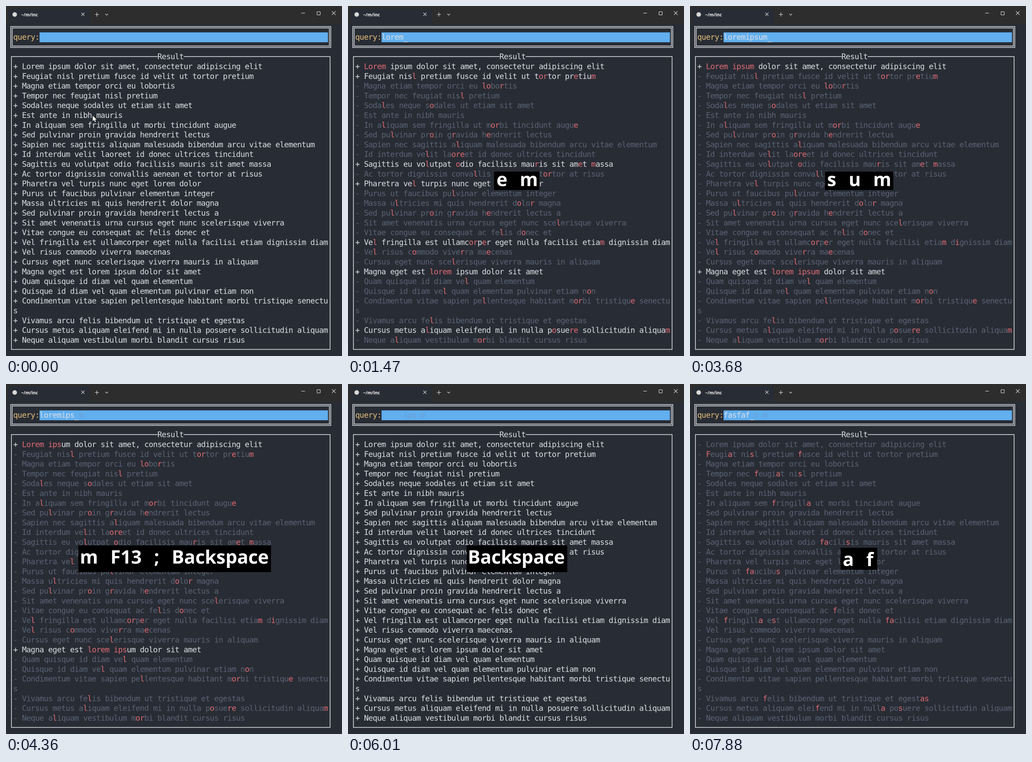
An HTML page with a canvas for the animation above (8 s loop, 734 px wide and 763 px high).

```html
<!DOCTYPE html>
<html lang="en">
<head>
<meta charset="utf-8">
<title>Incremental search</title>
<style>
  html, body { margin: 0; width: 100%; height: 100%; overflow: hidden; background: #282c34; }
  canvas { display: block; width: 734px; height: 763px; }
</style>
</head>
<body>
<canvas width="1468" height="1526"></canvas>
<script>
const ctx = document.querySelector('canvas').getContext('2d');
ctx.scale(2, 2); // double resolution keeps rows at fractional heights

const LOOP = 8000, COLS = 72, CELL = 9.545, PITCH = 21.3, LEFT = 16.1, BASE = 137.5;
const INSET = -0.35; // centres a glyph in its slightly narrower cell
const BG = '#282c34', FG = '#dcdfe4', DIM = '#5a6374', RED = '#e06c75', YELLOW = '#e5c07b', BLUE = '#61afef';
const MONO = '17px "DejaVu Sans Mono", monospace';

const lines = `Lorem ipsum dolor sit amet, consectetur adipiscing elit
Feugiat nisl pretium fusce id velit ut tortor pretium
Magna etiam tempor orci eu lobortis
Tempor nec feugiat nisl pretium
Sodales neque sodales ut etiam sit amet
Est ante in nibh mauris
In aliquam sem fringilla ut morbi tincidunt augue
Sed pulvinar proin gravida hendrerit lectus
Sapien nec sagittis aliquam malesuada bibendum arcu vitae elementum
Id interdum velit laoreet id donec ultrices tincidunt
Sagittis eu volutpat odio facilisis mauris sit amet massa
Ac tortor dignissim convallis aenean et tortor at risus
Pharetra vel turpis nunc eget lorem dolor
Purus ut faucibus pulvinar elementum integer
Massa ultricies mi quis hendrerit dolor magna
Sed pulvinar proin gravida hendrerit lectus a
Sit amet venenatis urna cursus eget nunc scelerisque viverra
Vitae congue eu consequat ac felis donec et
Vel fringilla est ullamcorper eget nulla facilisi etiam dignissim diam
Vel risus commodo viverra maecenas
Cursus eget nunc scelerisque viverra mauris in aliquam
Magna eget est lorem ipsum dolor sit amet
Quam quisque id diam vel quam elementum
Quisque id diam vel quam elementum pulvinar etiam non
Condimentum vitae sapien pellentesque habitant morbi tristique senectus
Vivamus arcu felis bibendum ut tristique et egestas
Cursus metus aliquam eleifend mi in nulla posuere sollicitudin aliquam
Neque aliquam vestibulum morbi blandit cursus risus`.split('\n');

// time in ms, query, keys on screen
const steps = [
  [0, '', ''], [270, 'l', 'l'], [540, 'lo', 'l o'], [610, 'lor', 'l o r'],
  [1200, 'lor', 'o r'], [1270, 'lore', 'o r e'], [1400, 'lore', 'r e'], [1470, 'lorem', 'e m'],
  [2210, 'lorem', 'm'], [2340, 'loremi', 'm i'], [2410, 'loremi', 'i'],
  [2670, 'loremip', 'i'], [2740, 'loremip', 'i p'],
  [3270, 'loremip', 'p'], [3340, 'loremips', 'p s'], [3410, 'loremipsu', 'p s u'], [3680, 'loremipsum', 's u m'],
  [4020, 'loremipsum', 's u m F13'], [4090, 'loremipsum', 's u m F13 ;'],
  [4220, 'loremipsu', 's u m F13 ; Backspace'], [4290, 'loremipsu', 'u m F13 ; Backspace'],
  [4360, 'loremips', 'm F13 ; Backspace'], [4490, 'loremip', 'm F13 ; Backspace'],
  [4560, 'loremip', 'F13 ; Backspace'], [4690, 'loremi', 'F13 ; Backspace'],
  [4950, 'lorem', '; Backspace'], [5010, 'lore', 'Backspace'], [5210, 'lor', 'Backspace'],
  [5280, 'lo', 'Backspace'], [5350, '', 'Backspace'], [6010, '', 'Backspace'],
  [6350, 'f', 'f'], [6620, 'fa', 'f a'], [6750, 'fas', 'f a s'], [6950, 'fasf', 'f a s f'],
  [7280, 'fasf', 'a s f'], [7350, 'fasfa', 'a s f a'], [7550, 'fasfa', 's f a'],
  [7680, 'fasfaf', 'f a f'], [7880, 'fasfaf', 'a f']
];

function fill(color, x, y, w, h) {
  ctx.fillStyle = color;
  ctx.fillRect(x, y, w, h);
}

function frame(x, y, right, bottom) {
  ctx.strokeRect(x, y, right - x, bottom - y);
}

function trace(...points) {
  ctx.beginPath();
  points.forEach(([x, y], i) => i ? ctx.lineTo(x, y) : ctx.moveTo(x, y));
}

function path(...points) {
  trace(...points);
  ctx.stroke();
}

function cross(x, y, r) {
  path([x - r, y - r], [x + r, y + r]);
  path([x - r, y + r], [x + r, y - r]);
}

// Places each character in its terminal cell, wrapping at the last column
function print(text, row, col, colorAt) {
  ctx.font = MONO;
  [...text].forEach((ch, i) => {
    const n = col + i;
    ctx.fillStyle = colorAt(i);
    ctx.fillText(ch, LEFT + INSET + n % COLS * CELL, BASE + (row + Math.floor(n / COLS)) * PITCH);
  });
}

function drawTitleBar() {
  fill('#2d2d2d', 0, 0, 734, 38);
  ctx.fillStyle = BG;
  ctx.beginPath();
  ctx.roundRect(5, 6, 178, 32, [6, 6, 0, 0]);
  ctx.fill();
  ctx.fillStyle = '#d8d8d8';
  ctx.beginPath();
  ctx.arc(19, 18.5, 5, 0, 7);
  ctx.fill();
  ctx.fillStyle = '#fff';
  ctx.font = 'bold 9.5px "Open Sans", sans-serif';
  ctx.fillText('~/m/inc', 33, 22.5);
  ctx.strokeStyle = '#e4e4e4';
  ctx.lineWidth = 1;
  cross(168, 18, 3.5);
  path([194.5, 18.5], [203, 18.5]);
  path([198.5, 14], [198.5, 23]);
  path([217, 17], [220, 20], [223, 17]);
  path([645, 15.5], [653, 15.5]);
  ctx.beginPath();
  ctx.roundRect(679.5, 12.5, 7, 7, 1);
  ctx.stroke();
  cross(716, 15.5, 4);
}

function drawBoxes() {
  ctx.strokeStyle = FG;
  ctx.lineWidth = 1.5;
  frame(10.4, 44.7, 709.5, 90.4);
  frame(13.5, 47.8, 706.5, 87.3);
  frame(11.8, 110.3, 708, 748.6);
  fill(BG, LEFT + 33 * CELL, 102, 6 * CELL, 16);
  print('Result', -1, 33, () => FG);
}

function drawQuery(t, query) {
  print('query:', -3, 0, () => YELLOW);
  fill(BLUE, 73.3, 57.5, 630, 21.5);
  // Faint remains of erased letters
  if (t >= 4220) {
    print('     ips m', -3, 6, i => i > query.length ? '#6a9fd4' : 'transparent');
  }
  print(query, -3, 6, () => FG);
  if (query || t === 5350) fill(FG, LEFT + (6 + query.length) * CELL, 78, CELL, 1);
}

function drawResults(query) {
  let row = 0;
  for (const line of lines) {
    let found = 0;
    const hits = [...line.toLowerCase()].map(ch => ch === query[found] && ++found > 0);
    const match = found === query.length;
    const text = (match ? '+ ' : '- ') + line;
    print(text, row, 0, i => hits[i - 2] ? RED : match ? FG : DIM);
    row += Math.ceil(text.length / COLS);
  }
}

function drawPointer(x, y) {
  trace([x, y], [x, y + 12], [x + 2.8, y + 9.5], [x + 4.8, y + 14],
    [x + 6.8, y + 13], [x + 4.9, y + 8.8], [x + 8.5, y + 8.6]);
  ctx.closePath();
  ctx.strokeStyle = '#000';
  ctx.lineWidth = 1;
  ctx.stroke();
  ctx.fillStyle = '#fff';
  ctx.fill();
}

function drawKeys(keys) {
  if (!keys) return;
  const text = keys.replaceAll(' ', '  ');
  ctx.font = 'bold 40.4px "Open Sans", "Noto Sans", sans-serif';
  ctx.wordSpacing = '3px';
  const m = ctx.measureText(text);
  const left = m.actualBoundingBoxLeft, up = m.actualBoundingBoxAscent;
  const w = left + m.actualBoundingBoxRight, h = up + m.actualBoundingBoxDescent;
  const x = 368.8 - w / 2, y = 381.2 - h / 2;
  fill('#000', Math.round(x - 6), Math.round(y - 8.5), Math.round(w + 12), Math.round(h + 17));
  ctx.fillStyle = '#fff';
  ctx.fillText(text, x + left, y + up);
  ctx.wordSpacing = '0px';
}

let shown;
function tick(now) {
  const step = steps.findLast(s => s[0] <= now % LOOP);
  if (step !== shown) {
    shown = step;
    const [t, query, keys] = step;
    fill(BG, 0, 0, 734, 763);
    drawTitleBar();
    drawBoxes();
    drawQuery(t, query);
    drawResults(query);
    if (t === 0) drawPointer(189.5, 239);
    drawKeys(keys);
  }
  requestAnimationFrame(tick);
}
tick(0);
</script>
</body>
</html>
```
